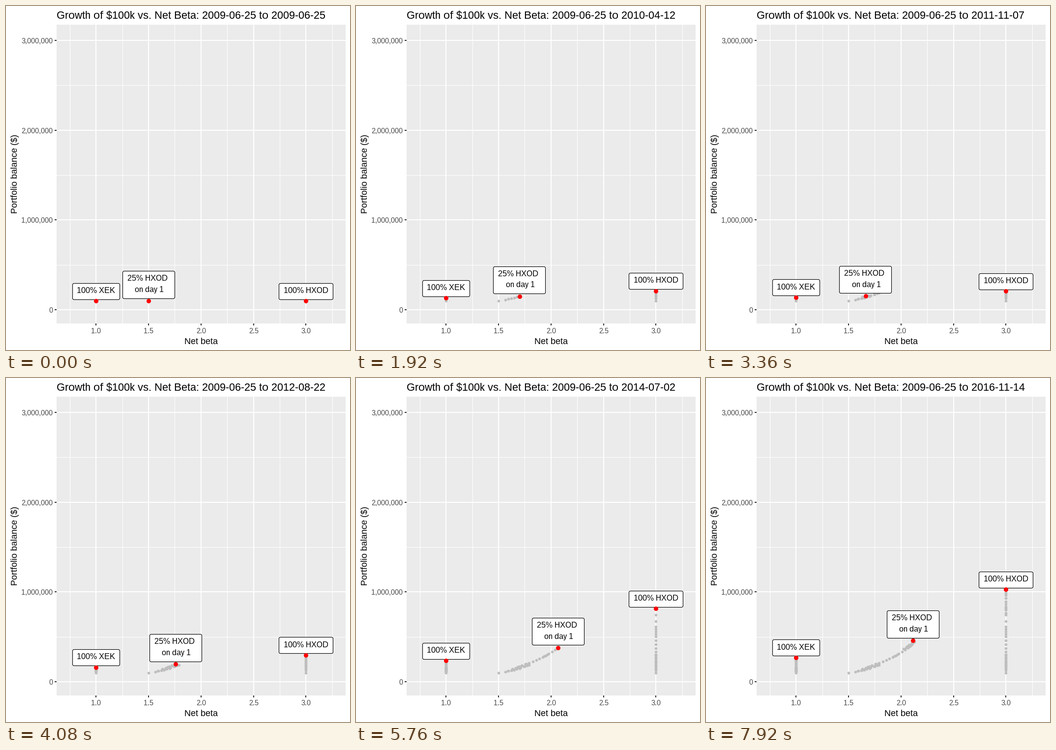
A matplotlib script for the animation above (8 s loop, 700 px wide and 700 px high).

```python
import numpy as np
import matplotlib.pyplot as plt
from matplotlib.animation import FuncAnimation
from matplotlib.patches import FancyBboxPatch, Rectangle

# Whole-pixel glyph advances
plt.rcParams.update({"font.family": "Liberation Sans",
                     "text.hinting": "native", "text.hinting_factor": 1})
PX = 0.72  # points per pixel at 100 dpi

FRAMES, INTERVAL = 200, 40
HOLD, STEP = 33, 3  # ticks before the first move, ticks per move
MOVES = (FRAMES - HOLD - 1) // STEP + 1
DAYS_PER_STEP = 33.225

# Turning points of the index (step: level) and of the leverage cost
TURNS = {0: 920, 1: 1006, 6: 1196, 8: 1065, 12: 1291, 14: 1364, 17: 1167, 21: 1419,
         22: 1295, 24: 1413, 26: 1416, 31: 1686, 35: 1797, 38: 1975, 40: 1965,
         46: 2114, 47: 1942, 48: 2071, 50: 1939, 53: 2113, 56: 2164}
COST = {0: 0, 16: 0.21, 20: 0.345, 46: 0.553, 56: 0.671}

steps = np.arange(MOVES + 1)


def through(points):
    return np.interp(steps, list(points), list(points.values()))


# Growth in units of $100k: index with dividends, 3x fund, 75/25 blend
base = through(TURNS) / TURNS[0] * np.exp(0.0026 * steps)
triple = base ** 3 * np.exp(-through(COST))
mix = 0.75 * base + 0.25 * triple
mix_beta = 0.75 * (base + triple) / mix


def weekday_of(year, month, n, day):
    return np.busday_offset(f"{year}-{month:02}-01", n, roll="forward", weekmask=day)


def observed(year, month_day):
    day = np.datetime64(f"{year}-{month_day}")
    moved = day + {5: -1, 6: 1}.get((day.astype(int) + 3) % 7, 0)
    return moved if str(moved).startswith(str(year)) else day


def good_friday(year):
    d = (19 * (year % 19) + 24) % 30
    e = (2 * (year % 4) + 4 * (year % 7) + 6 * d + 5) % 7
    return np.datetime64(f"{year}-03-20") + d + e


def market_holidays():
    days = [np.datetime64("2012-10-29"), np.datetime64("2012-10-30")]  # storm closure
    for y in range(2009, 2017):
        days += [observed(y, md) for md in ("01-01", "07-04", "12-25")]
        days += [weekday_of(y, m, n, d) for m, n, d in
                 [(1, 2, "Mon"), (2, 2, "Mon"), (6, -1, "Mon"), (9, 0, "Mon"), (11, 3, "Thu")]]
        days.append(good_friday(y))
    return np.array(days, dtype="datetime64[D]")


START = np.datetime64("2009-06-25")
dates = np.busday_offset(START, np.rint(steps * DAYS_PER_STEP).astype(int),
                         holidays=market_holidays())


def to_x(beta):
    return 183.3 + (beta - 1) * 213.5


def to_y(growth):
    return 618.5 - growth * 18.267


xs = to_x(np.column_stack([np.full(len(steps), 1.0), mix_beta, np.full(len(steps), 3.0)]))
ys = to_y(np.column_stack([base, mix, triple]))

fig = plt.figure(figsize=(7, 7), dpi=100, facecolor="white")
ax = fig.add_axes([0, 0, 1, 1])
ax.set(xlim=(0, 700), ylim=(700, 0))
ax.axis("off")


def box(x, y, w, h, color):
    ax.add_patch(Rectangle((x, y), w, h, fc=color, lw=0, antialiased=False, zorder=1))


def text(x, y, s, size, color="black", ha="left", **kw):
    return ax.text(x, y, s, fontsize=size * PX, color=color, ha=ha, va="baseline", **kw)


# Panel, grid and axes
box(103, 38, 588, 608, "#EBEBEB")
for x in (130, 237, 343, 450, 557, 664):
    box(x, 38, 1, 608, "white")
for y in (161, 344, 527):
    box(103, y, 588, 1, "white")
for i, x in enumerate((183, 290, 397, 504, 610)):
    box(x - 1, 38, 2, 608, "white")
    box(x - 1, 646, 2, 4, "#333333")
    text(x, 666, f"{1 + i / 2:.1f}", 15, "#4D4D4D", "center")
for i, y in enumerate((618, 435, 253, 70)):
    box(103, y - 1, 588, 2, "white")
    box(99, y - 1, 4, 2, "#333333")
    text(95.5, y + 6, f"{i * 1000000:,}", 15, "#4D4D4D", "right")
text(397, 688, "Net beta", 18, ha="center")
text(23, 342, "Portfolio balance ($)", 18, ha="center", rotation=90, rotation_mode="anchor")
title = text(103, 26, "", 22)

trail, = ax.plot([], [], "o", ms=5.6 * PX, mew=0, color="#BEBEBE", zorder=3)
heads, = ax.plot([], [], "o", ms=9 * PX, mew=0, color="red", zorder=7)


def snap(v):
    return np.floor(v) + 0.5


class Label:
    """Rounded tag that follows a point; lines are (text, dx, dy, align)."""

    def __init__(self, half, top, bottom, lines):
        self.half, self.top, self.bottom = half, top, bottom
        self.patch = FancyBboxPatch((0, 0), 1, 1, boxstyle="round,pad=0,rounding_size=3",
                                    fc="white", ec="black", lw=1.1 * PX, zorder=5)
        ax.add_patch(self.patch)
        self.lines = [(text(0, 0, s, 16, ha=ha, zorder=6), dx, dy)
                      for s, dx, dy, ha in lines]

    def move(self, x, y):
        top, bottom = snap(y + self.top), snap(y + self.bottom)
        self.patch.set_bounds(snap(x - self.half), top, 2 * self.half, bottom - top)
        for t, dx, dy in self.lines:
            t.set_position((x + dx, y + dy))


labels = [
    Label(48, -36.15, -3, [("100% XEK", 0, -16.2, "center")]),
    Label(53, -60.5, -5.2, [("25% HXOD", -43.5, -41, "left"), ("on day 1", -28, -18.2, "left")]),
    Label(55, -36.15, -3, [("100% HXOD", 0, -16.2, "center")]),
]


def update(frame):
    k = 0 if frame < HOLD else (frame - HOLD) // STEP + 1
    title.set_text(f"Growth of $100k vs. Net Beta: {START} to {dates[k]}")
    trail.set_data(xs[:k].ravel(), ys[:k].ravel())
    heads.set_data(xs[k], ys[k])
    for label, x, y in zip(labels, xs[k], ys[k]):
        label.move(x, y)
    return []


anim = FuncAnimation(fig, update, frames=FRAMES, interval=INTERVAL, repeat=True, repeat_delay=0)
plt.show()
```
